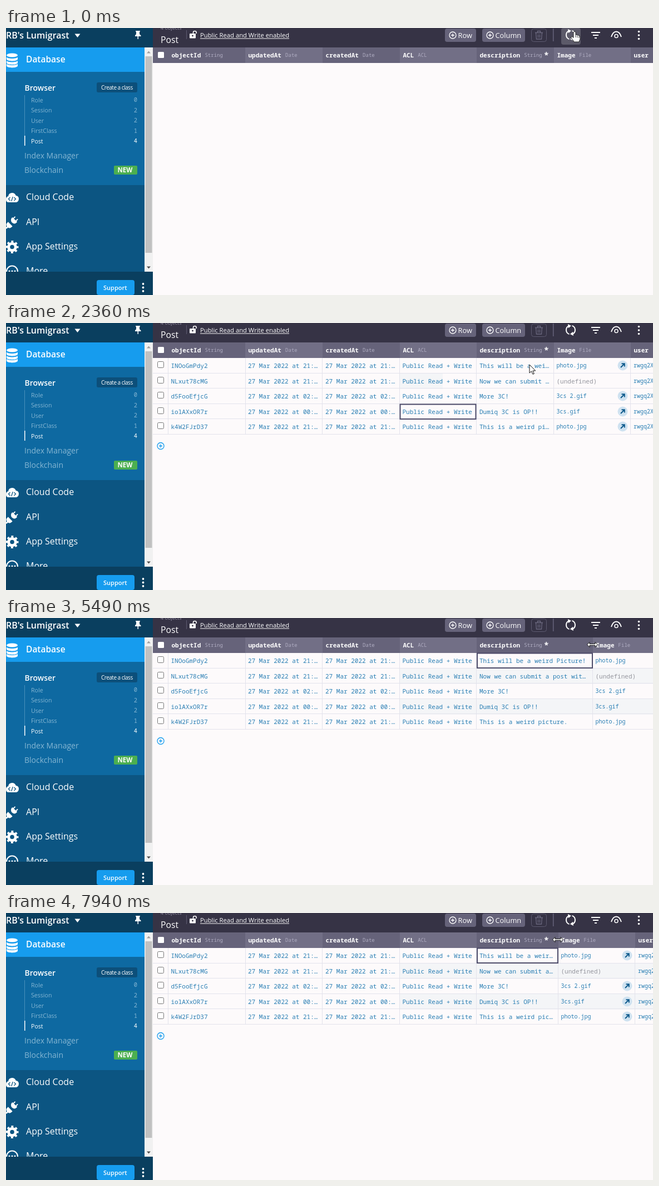
Recreate the animation shown at these times as an HTML page. Size 1163 by 481 pixels, loop 8 s.

```html
<!DOCTYPE html>
<html lang="en">
<head>
<meta charset="utf-8">
<title>Data browser</title>
<style>
  html, body { margin: 0; width: 100%; height: 100%; overflow: hidden; background: #fdfafb; }
  svg { display: block; width: 1163px; height: 481px; }
  text { font-family: "Open Sans", "Noto Sans", sans-serif; white-space: pre; }
  .mono { font-family: "Noto Sans Mono", "DejaVu Sans Mono", monospace; }
  .semi { font-weight: 600; }
  .bold { font-weight: 700; }
  .tight { letter-spacing: -.5px; }
  .end { text-anchor: end; }
  .line { fill: none; stroke: #fff; stroke-width: 1.5; }
</style>
</head>
<body>
<svg viewBox="0 0 1163 481">
  <g id="table"></g>
  <g id="toolbar"></g>
  <g id="sidebar"></g>
  <g id="pointer"></g>
</svg>
<script>
const LOOP = 8000;
const CHAR = 6.62;            // advance of the 11px monospaced cell text
const DESC = 846;             // left edge of the resizable column
const BLUE = '#2a7fb4', GRID = '#e3e3ec', HEAD = ['#66637a', '#726f86'];

const rows = [
  ['INOoGmPdy2', '21', 'This will be a weird Picture!', 'photo.jpg'],
  ['NLxut78cMG', '21', 'Now we can submit a post with no picture', ''],
  ['d5FooEfjcG', '02', 'More 3C!', '3cs 2.gif'],
  ['iolAXxOR7r', '00', 'Dumiq 3C is OP!!', '3cs.gif'],
  ['k4W2FJrD37', '21', 'This is a weird picture.', 'photo.jpg']
];

// Pointer steps: time, x, y, shape
const moves = [
  [0, 1022, 6, 'hand'], [430, 769, 56, 'arrow'], [580, 769, 78, 'arrow'], [700, 769, 103, 'arrow'],
  [850, 772, 118, 'arrow'], [970, 781, 150, 'arrow'], [1090, 797, 190, 'arrow'], [1210, 811, 220, 'arrow'],
  [1360, 826, 212, 'arrow'], [1480, 851, 190, 'arrow'], [1600, 884, 158, 'arrow'], [1720, 915, 125, 'arrow'],
  [1840, 938, 99, 'arrow'], [1990, 938, 83, 'arrow'], [2240, 940, 78, 'arrow'], [2360, 941, 75, 'arrow'],
  [3290, 957, 68, 'arrow'], [3410, 976, 55, 'arrow'], [3530, 987, 50, 'arrow'],
  [3800, 991, 48, 'resize'], [4080, 987, 46, 'arrow'], [4360, 983, 40, 'resize']
];
// Column drag: time, right edge, pointer y
const drags = [
  [0, 985], [4950, 1012, 41], [5070, 1019, 43], [5220, 1022, 44], [5370, 1040, 46], [5490, 1055, 48],
  [6010, 1040, 48], [6130, 1023, 48], [6690, 1034, 48], [6840, 1062, 48], [6990, 1067, 48],
  [7670, 1038, 48], [7790, 1008, 48], [7940, 993, 48]
];

const text = (x, y, str, size, fill = '#fff', cls = '') =>
  `<text x="${x}" y="${y}" font-size="${size}" fill="${fill}" class="${cls}">${str}</text>`;
const mono = (x, y, str, size, fill, cls = '') => text(x, y, str, size, fill, 'mono ' + cls);
const rect = (x, y, w, h, fill, more = '') =>
  `<rect x="${x}" y="${y}" width="${w}" height="${h}" fill="${fill}" ${more}/>`;
const path = (d, more = 'class="line"') => `<path d="${d}" ${more}/>`;
const circle = (x, y, r, more = 'fill="#fff"') => `<circle cx="${x}" cy="${y}" r="${r}" ${more}/>`;
const dots = (x, ys, r) => ys.map(y => circle(x, y, r)).join('');
const at = (x, y, inner, more = '') => `<g transform="translate(${x} ${y}) ${more}">${inner}</g>`;
const rowTop = i => Math.round(63 + 27.6 * i);
const clip = (str, width) => {
  const n = Math.floor(width / CHAR);
  return str.length > n ? str.slice(0, n - 1) + '…' : str;
};
const plusIcon = (x, y, color) =>
  circle(x, y, 6, `fill="none" stroke="${color}" stroke-width="1.3"`) +
  path(`M${x - 3} ${y}h6M${x} ${y - 3}v6`, `stroke="${color}" stroke-width="1.3"`);

const cursors = {
  arrow: path('M0 0V15L3.5 11.8 6 17.3 8.3 16.3 5.9 11H10.7Z', 'fill="#fff" stroke="#111"'),
  resize: path('M-9.5 0L-5 -4.5V-1.3H5V-4.5L9.5 0 5 4.5V1.3H-5V4.5Z', 'fill="#fff" stroke="#111"'),
  hand: path('M-2 1.5Q0-1 2 1.5V6.5Q4 5 5 7.2 7 6 8 8.2 10 8 10 10V14Q9 16 8 19H-1Q-3 15-6 12-7 9-4.5 9.5L-2 11.5Z',
    'fill="#fff" stroke="#222"') + path('M2 7v4M5 8v3.5M8 9v3', 'stroke="#444"')
};

function header(edge) {
  const cols = [
    [292, 'objectId', 'String'], [430, 'updatedAt', 'Date'], [569, 'createdAt', 'Date'],
    [708, 'ACL', 'ACL'], [DESC, 'description', 'String'], [edge, 'Image', 'File'], [edge + 138, 'user', '']
  ];
  return rect(264, 35, 28, 28, HEAD[0]) + rect(273, 43, 11, 11, '#fff', 'rx="1.5"') +
    cols.map(([x, name, type], i) =>
      rect(x, 35, 1163 - DESC, 28, HEAD[i % 2]) + mono(x + 5.5, 52.5, name, 11, '#fff', 'semi') +
      mono(x + 12.5 + name.length * CHAR, 52, type, 9, '#b0adc2')).join('') +
    text(967.5, 54, '*', 14, '#fff', 'bold');
}

function row([id, hour, desc, file], i, edge, time) {
  const top = rowTop(i), mid = top + 14, base = top + 17.5;
  const date = `27 Mar 2022 at ${hour}:…`;
  const shadeEnd = time >= 4950 ? 1163 : time >= 2760 ? 984 : time >= 700 && i === 1 ? 785 : 708;
  return (i % 2 ? rect(708, top, shadeEnd - 708, 28, '#f4f5f7') : '') +
    rect(272.5, top + 6.5, 11, 11, '#fff', 'rx="2" stroke="#767676"') +
    mono(296.5, base, id, 11, BLUE) + mono(435, base, date, 11, BLUE) + mono(574, base, date, 11, BLUE) +
    mono(712.5, base, 'Public Read + Write', 11, BLUE) +
    mono(851, base, clip(desc, edge - 857), 11, BLUE) +
    (file
      ? mono(edge + 4.5, base - .5, file, 10, BLUE) + circle(edge + 123.5, mid - .5, 9, 'fill="#cfe2f0"') +
        at(edge + 123.5, mid - .5, path('M-3.5 3.5L2.5-2.5M-2-3.3H3.3V2', 'fill="none" stroke="#0e5a8c" stroke-width="2"'))
      : mono(edge + 4.5, base, '(undefined)', 11, '#96979f')) +
    mono(edge + 143, base - .5, 'rwgq2XkT9p', 10, BLUE) +
    path(`M264 ${rowTop(i + 1) - .5}H1163`, `stroke="${GRID}"`);
}

function table(time, edge) {
  if (time < 120) return header(edge);
  const lines = [292, 431, 569, 708, DESC, edge, edge + 138].map(x => `M${x - .5} 63V201`).join('');
  const editing = time >= 2760;
  const [x, y, w] = editing ? [847, 63.5, edge - 848] : [708.5, 146.5, 136];
  return rows.map((r, i) => row(r, i, edge, time)).join('') + path(lines, `stroke="${GRID}"`) +
    header(edge) + rect(x, y, w, 26.5, 'none', 'stroke="#4d4b69" stroke-width="2"') +
    plusIcon(278, 221.5, '#169cee');
}

function toolbar(hover) {
  const button = (x, w, label) =>
    rect(x, 1, w, 24, '#66637a', 'rx="4"') + plusIcon(x + 14, 13, '#fff') + text(x + 23.5, 17.5, label, 12.8);
  return rect(264, 0, 899, 35, '#363345') + text(278, 3, '4 objects', 9, '#8d8a9e') +
    text(278, 27, 'Post', 15.7) + path('M324.5 4V20', 'stroke="#5d5a70"') +
    rect(330, 10, 11, 8.5, '#fff', 'rx="1"') + path('M336.5 10V8Q336.5 5.5 339.3 5.5T342.2 8V10') +
    circle(335.5, 14, 1.4, 'fill="#363345"') +
    text(349, 17, 'Public Read and Write enabled', 11.25) + rect(349, 18.5, 160, 1, '#fff') +
    button(789, 56, 'Row') + button(856, 77, 'Column') +
    rect(944.5, 1.5, 27, 23, 'none', 'rx="4" stroke="#5d5a70"') +
    path('M951 8.5H965M955.5 8V5.5H960.5V8M952.5 9L953.5 20H962.5L963.5 9M956.5 11.5V17.5M959.5 11.5V17.5',
      'fill="none" stroke="#6a677e" stroke-width="1.3"') +
    rect(983, 1, 1.5, 23, '#66637a') + (hover ? rect(998, 0, 35, 30, '#5c5a69', 'rx="4"') : '') +
    at(1015, 12.5, [0, 180].map(a => `<g transform="rotate(${a})">` +
      path('M-2.5 7.6A8 8 0 0 1-3.5-7.2', 'class="line" style="stroke-width:2"') +
      path('M-5-10.5L1-7.5-4-3.2Z', 'fill="#fff"') + '</g>').join('')) +
    path('M1052 8H1068M1055 13H1065M1058 18H1062', 'stroke="#fff" stroke-width="1.8"') +
    path('M1088 16Q1091 6.5 1097 6.5T1106 16', 'class="line" style="stroke-width:1.8"') +
    circle(1097, 14.5, 3, 'class="line"') + dots(1137.5, [6.5, 13, 19.5], 1.8);
}

function sidebar() {
  const faded = '#85b6d3';
  const classes = [['Role', 0], ['Session', 2], ['User', 2], ['FirstClass', 1], ['Post', 4]];
  const list = classes.map(([name, count], i) => {
    const y = 133.8 + 18.5 * i, color = i === 4 ? '#fff' : faded;
    return text(45, y, name, 10.6, color) + mono(236, y - .5, count, 10.5, color, 'end');
  }).join('');
  const disc = y => path(`M1 ${y}V${y + 4}C1 ${y + 8.5} 21 ${y + 8.5} 21 ${y + 4}V${y}C21 ${y + 4} 1 ${y + 4} 1 ${y}Z`, 'fill="#fff"');
  const plug = rect(-4.5, -11, 2, 5, '#fff') + rect(2.5, -11, 2, 5, '#fff') +
    path('M-6.5-6.5H6.5V-4Q6 1 1.2 1.5H-1.2Q-6-.5-6.5-4Z', 'fill="#fff"');
  const socket = path('M-6 3H6V6Q6 10 1.5 11V15H-1.5V11Q-6 10-6 6Z', 'fill="#fff"');
  return rect(0, 0, 249, 481, '#0c5582') +
    rect(0, 35, 249, 44, '#169cee') + rect(0, 79, 249, 204, '#0e69a1') +
    `<ellipse cx="11" cy="49" rx="10" ry="3.6" fill="#fff"/>` + disc(52) + disc(58.5) + disc(64) +
    text(36, 62, 'Database', 15.5, '#fff', 'semi') + text(33.5, 112.5, 'Browser', 14, '#fff', 'semi') +
    rect(163, 98, 73, 18, '#0c4f7a', 'rx="3"') + text(171, 110.8, 'Create a class', 10, '#fff', 'tight') +
    list + rect(33, 121, 1, 74, '#4a90bb') + rect(33, 194, 1.5, 18, '#fff') +
    text(33, 235.3, 'Index Manager', 14, faded) + text(33, 261.3, 'Blockchain', 14, faded) +
    rect(194, 248, 42, 16, '#4caf50', 'rx="2"') + text(200.5, 260.3, 'NEW', 11.5, '#fff', 'bold') +
    text(36, 310, 'Cloud Code', 16) + text(36, 354.5, 'API', 16) +
    text(36, 399, 'App Settings', 16) + text(36, 442.5, 'More', 16) +
    path('M5 314Q0 314 0 308.5 0 304 4 303.3 5 297 11 297 16 297 17.8 302 23 302.5 23 308 22.5 314 17 314Z', 'fill="#fff"') +
    path('M7.5 305L4.5 308 7.5 311M14.5 305L17.5 308 14.5 311M12.3 304L9.7 312', 'fill="none" stroke="#0c5582" stroke-width="1.3"') +
    at(11, 350, at(0, 2, socket) + at(0, -1, plug, 'rotate(0)'), 'rotate(45) scale(.92)') +
    circle(11, 394.5, 6.3, 'fill="none" stroke="#fff" stroke-width="5"') +
    circle(11, 394.5, 9.7, 'fill="none" stroke="#fff" stroke-width="3.6" stroke-dasharray="3.81" stroke-dashoffset="1.9"') +
    circle(11, 438.5, 10, 'fill="none" stroke="#fff" stroke-width="2"') +
    [6, 11, 16].map(x => circle(x, 438, 1.5)).join('') +
    rect(249, 35, 15, 404, '#f1f1f1') + rect(250.5, 51, 12, 354, '#c1c1c1') +
    path('M253 45.5H260L256.5 41.5Z', 'fill="#a0a0a0"') + path('M253 429.5H260L256.5 433.5Z', 'fill="#505050"') +
    rect(0, 0, 264, 35, '#0a3f5f') + text(0, 19.3, "RB's Lumigrast", 16, '#fff', 'semi') +
    path('M123.5 10.5H133.5L128.5 17Z', 'fill="#fff"') +
    path('M233 5H241V6.5H240V11L242.5 13.5V15H238V20H236.5V15H232V13.5L234 11V6.5H233Z', 'fill="#fff"') +
    rect(0, 439, 264, 42, '#0a3f5f') + rect(163, 454, 68, 27, '#169cee', 'rx="4"') +
    text(175, 471.8, 'Support', 11, '#fff', 'semi') + dots(246.5, [461, 467.5, 474], 1.9);
}

const $ = id => document.getElementById(id);
const stepAt = (steps, time) => steps.filter(s => s[0] <= time).pop();
const dataTime = time => [4950, 2760, 700, 120, 0].find(t => t <= time);
let shown = '';

function render(now) {
  const time = now % LOOP;
  const [, edge, dragY] = stepAt(drags, time);
  const [, x, y, shape] = dragY ? [0, edge - 1, dragY, 'resize'] : stepAt(moves, time);
  const key = [edge, x, y, shape, dataTime(time)].join();
  if (key !== shown) {
    shown = key;
    $('table').innerHTML = table(time, edge);
    $('toolbar').innerHTML = toolbar(shape === 'hand');
    $('pointer').innerHTML = at(x, y, cursors[shape]);
  }
}

$('sidebar').innerHTML = sidebar();
const start = performance.now();
(function tick() {
  render(performance.now() - start);
  requestAnimationFrame(tick);
})();
</script>
</body>
</html>
```
